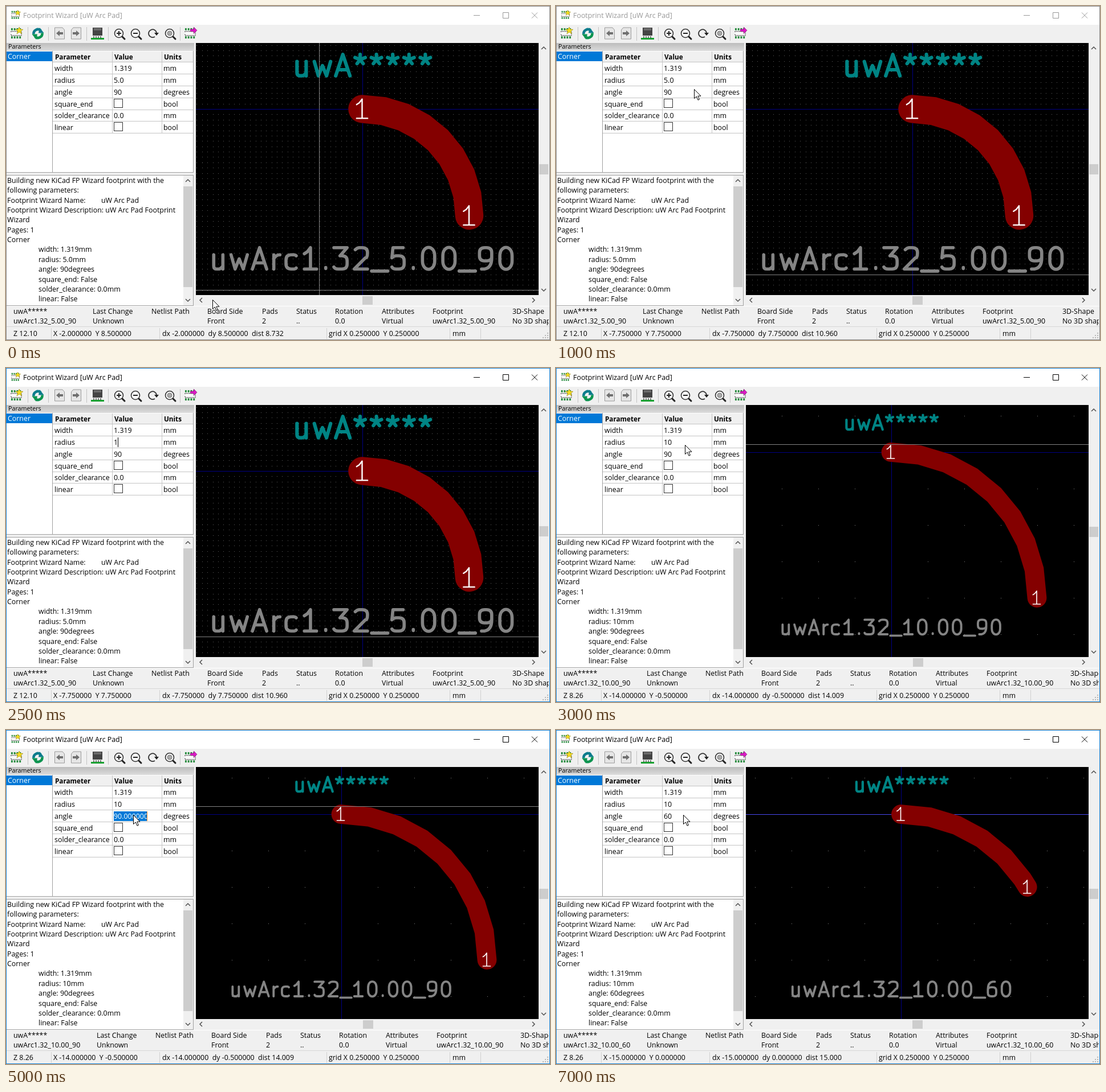
Recreate the animation shown at these times as an HTML page. Size 954x587 px, loop 8 s.

```html
<!DOCTYPE html>
<html lang="en">
<head>
<meta charset="utf-8">
<title>Footprint Wizard</title>
<style>
  html, body { margin: 0; width: 100%; height: 100%; overflow: hidden; background: #f0f0f0; }
  svg { display: block; }
  text { font: 12.4px "Open Sans", "Noto Sans", sans-serif; white-space: pre; }
  .bold { font-weight: 700; font-size: 11.7px; }
  .small { font-size: 10.7px; }
  .timed { visibility: hidden; animation: 8s step-end infinite; }
</style>
</head>
<body>
<svg id="stage" width="954" height="587" viewBox="0 0 954 587"></svg>
<script>
const LOOP = 8000;
const rules = [];

const during = (from, to, content) => {
  const name = `show${rules.length}`;
  const at = ms => ms / LOOP * 100 + '%';
  rules.push(`@keyframes ${name} { 0% { visibility: hidden } ${at(from)} { visibility: visible } ` +
    `${at(to)} { visibility: ${to === LOOP ? 'visible' : 'hidden'} } }`);
  return `<g class="timed" style="animation-name:${name}">${content}</g>`;
};
const box = (x, y, w, h, fill) => `<rect x="${x}" y="${y}" width="${w}" height="${h}" fill="${fill}"/>`;
const text = (x, y, s, fill = '#000', cls = '') => `<text x="${x}" y="${y}" fill="${fill}" class="${cls}">${s}</text>`;
const line = (d, stroke, width = 1, extra = '') =>
  `<path d="${d}" fill="none" stroke="${stroke}" stroke-width="${width}" ${extra}/>`;
const shape = (d, fill, extra = '') => `<path d="${d}" fill="${fill}" ${extra}/>`;
const place = (x, y, content, more = '') => `<g transform="translate(${x} ${y}) ${more}">${content}</g>`;

// Single-stroke lettering: advance and path, cap height 21, baseline 0.
const GLYPHS = {
  u: [19, 'M14-14V0M5-14V-3Q5 0 8 0H10Q12 0 14-3'],
  w: [22, 'M3-14L7 0 11-10 15 0 19-14'],
  A: [18, 'M2 0L9-21 16 0M4-6H14'],
  r: [13, 'M5 0V-14M5-10Q7-14 11-14'],
  c: [18, 'M14-1Q13 0 12 0H9Q4 0 4-5V-9Q4-14 9-14H12Q13-14 14-13'],
  '*': [16, 'M8-21V-16M3-18L8-16 13-18M5-12L8-16 11-12'],
  '.': [10, 'M5-1.5v1'],
  _: [16, 'M0 2H16'],
  0: [20, 'M4-13C4-24 16-24 16-13V-8C16 3 4 3 4-8Z'],
  1: [20, 'M4-15L7-17 10-21V0M4 0H16'],
  2: [20, 'M4-19Q6-21 8-21H11Q16-21 16-16T14-11L3 0H16'],
  3: [20, 'M3-21H16L9-13H11Q16-13 16-8V-5Q16 0 11 0H7Q4 0 3-2'],
  5: [20, 'M15-21H5L4-11Q6-13 8-13H11Q16-13 16-8V-5Q16 0 11 0H8Q5 0 4-2'],
  6: [20, 'M14-21H11Q4-20 4-10V-5Q4 0 9 0H11Q16 0 16-5V-8Q16-13 11-13H9Q4-13 4-9'],
  9: [20, 'M6 0H9Q16-1 16-11V-16Q16-21 11-21H9Q4-21 4-16V-13Q4-8 9-8H11Q16-8 16-12']
};

const lettering = (label, cx, cy, size, weight, color) => {
  let x = 0, body = '';
  for (const ch of label) {
    const [advance, d] = GLYPHS[ch];
    body += `<path d="${d}" transform="translate(${x} 0)"/>`;
    x += advance;
  }
  const k = size / 21;
  return `<g aria-label="${label}" transform="translate(${cx - x * k / 2} ${cy + size / 2}) scale(${k})" fill="none" ` +
    `stroke="${color}" stroke-width="${weight / k}" stroke-linecap="round" stroke-linejoin="round">${body}</g>`;
};

// ---- drawing area ----
const VIEW = { left: 333, top: 65, right: 934, bottom: 508 };
const AXIS = '#000084', CROSS = '#848484';
const hline = (y, color) => box(VIEW.left, y, VIEW.right - VIEW.left, 1, color);
const vline = (x, color) => box(x, VIEW.top, 1, VIEW.bottom - VIEW.top, color);

const dots = (ox, oy, step, color) => {
  let d = '';
  for (let x = ox - Math.floor((ox - VIEW.left) / step) * step; x < VIEW.right - 1; x += step)
    for (let y = oy - Math.floor((oy - VIEW.top) / step) * step; y < VIEW.bottom - 1; y += step)
      d += `M${Math.round(x)} ${Math.round(y)}h1v1h-1z`;
  return shape(d, color);
};

const footprint = ({ ox, oy, mm, radius, angle, name, fine, axisY = AXIS }) => {
  const arcPoint = deg => {
    const a = deg * Math.PI / 180, r = radius * mm;
    return [ox + r * Math.sin(a), oy + r * (1 - Math.cos(a))];
  };
  const points = [];
  for (let deg = 0; deg < angle; deg += 11.25) points.push(arcPoint(deg));
  const end = arcPoint(angle);
  points.push(end);
  const padNumber = (x, y) => lettering('1', x - .5, y - .5, mm * .9, mm * .065, '#fff');
  return (fine ? dots(ox, oy, mm / 4, '#606060') : '') + dots(ox, oy, mm * 2.5, '#848484') +
    vline(Math.round(ox), AXIS) + hline(oy, axisY) +
    line('M' + points.map(p => p.map(v => v.toFixed(2))).join('L'), '#840000', 1.319 * mm, 'stroke-linecap="round"') +
    padNumber(ox, oy) + padNumber(...end) +
    lettering('uwA*****', ox + .5, oy - 2.055 * mm, mm, mm * .165, '#008484') +
    lettering(name, ox, oy + (radius + 2) * mm, mm, mm * .15, '#848484');
};

// ---- small interface parts ----
const chevron = (x, y, turn) =>
  place(x, y, line('M-4 2L0-2 4 2', '#505050', 1.5), `rotate(${turn})`);

const chip = (x, y, size, badge) => {
  let pads = '';
  for (let i = 0; i < 4; i++)
    for (const py of [1, 16])
      pads += box(1 + i * 5, py, 3, 4, '#248a3c');
  const body = line('M1 8.5V7H20V14.5H1V12', '#444', 1.3, 'stroke-dasharray="2 1"');
  const mark = badge === 'star'
    ? shape('M16-1l2 4 5 .5-4 3 1.5 5-4.5-3-4.5 3 1.5-5-4-3 5-.5z', '#f4dc20', 'stroke="#8a7a10" stroke-width=".6"')
    : shape('M11 3h6v-4l6 6-6 6V7h-6z', '#e018c8', 'stroke="#601058" stroke-width=".6"');
  return place(x, y, box(0, 5, 21, 11, '#fafafa') + body + pads + mark, `scale(${size / 22})`);
};

const page = (x, flip) => place(x, 48,
  shape('M-8.5-10H5L8.5-6V10H-8.5Z', '#e6e6e6', 'stroke="#999"') +
  shape('M-6 0L0-5V-2H6V2H0V5Z', '#707070'), flip ? 'scale(-1 1)' : '');

const magnifier = (x, inside) => place(x, 48,
  line('M4 5L9 10', '#222', 3, 'stroke-linecap="round"') +
  `<circle cx="-1" r="7.5" fill="#f8f8f8" stroke="#333" stroke-width="1.6"/>` + inside);

const swirl = color => line('M-7.5 1A7.5 7.5 0 0 1 5-5.5', color, 4.5) + shape('M3-10.5L10.5-1H1Z', color);

const toolbar = () => {
  const seps = [38, 74, 141, 179, 305].map(x => box(x, 37, 1, 24, '#c4c4c4')).join('');
  const refresh = place(56, 48.5, swirl('#0c7c8c') + `<g transform="rotate(180)">${swirl('#0c9450')}</g>`);
  let pins = '';
  for (let i = 0; i < 4; i++) pins += box(153 + i * 4, 53, 2, 4, '#777');
  const board = box(152, 38, 17, 14, '#444') + box(154, 39, 13, 4, '#6a6a6a') + pins + box(149, 56, 23, 3, '#18a030');
  const redraw = place(257, 48, line('M4 6A7 7 0 1 1 7-1', '#333', 1.8) + shape('M3-1H11L7 4Z', '#222'));
  const fit = `<circle cx="-1" r="4" fill="#aaa" stroke="#777"/>`;
  return chip(8, 38, 21, 'star') + refresh + page(94) + page(123, true) + board +
    magnifier(199, line('M-5 0H3M-1-4V4', '#222', 2)) + magnifier(228, line('M-5 0H3', '#222', 2)) + redraw +
    magnifier(288, fit) + chip(313, 38, 21, 'arrow') + seps;
};

const titleBar = (ink, border) =>
  text(30, 21, 'Footprint Wizard [uW Arc Pad]', ink) +
  line('M820 16.5H831M871.5 11.5H881.5V21.5H871.5ZM922 11.5L932 21.5M932 11.5L922 21.5', ink) +
  `<rect x=".5" y=".5" width="953" height="586" fill="none" stroke="${border}"/>`;

const ROWS = [['width', 'mm'], ['radius', 'mm'], ['angle', 'degrees'],
  ['square_end', 'bool'], ['solder_clearance', 'mm'], ['linear', 'bool']];
const rowY = i => Math.round(114.3 + i * 20.75);
const value = (row, s) => text(189, rowY(row), s);

const parameters = () => {
  let out = box(1, 65, 329, 14, 'url(#caption)') + text(4, 75, 'Parameters', '#000', 'small') +
    box(1, 79, 328, 214, '#fff') + box(1, 80, 80, 17, '#0078d7') + text(3, 93, 'Corner', '#fff') +
    box(82, 80, 246, 18, '#f0f0f0') + box(81, 79, 1, 214, '#a0a0a0');
  [[86, 'Parameter'], [190, 'Value'], [277, 'Units']].forEach(([x, s]) => out += text(x, 94, s, '#000', 'bold'));
  ROWS.forEach(([name, unit], i) => {
    const y = rowY(i);
    out += text(85, y, name) + text(276, y, unit) + box(82, y + 5, 246, 1, '#c4c4c4');
    if (unit === 'bool') out += `<rect x="189.5" y="${y - 13.5}" width="15" height="15" fill="#fff" stroke="#333"/>`;
  });
  out += box(82, 98, 246, 1, '#c4c4c4');
  for (const x of [186, 273, 328]) out += box(x, 80, 1, 143, '#c4c4c4');
  return out + box(1, 292, 328, 1, '#a0a0a0') + box(328, 79, 1, 214, '#a0a0a0') +
    value(0, '1.319') + value(4, '0.0');
};

const logY = i => 311 + i * 17.35;
const logPane = () => {
  const lines = ['Building new KiCad FP Wizard footprint with the', 'following parameters:', 'Footprint Wizard Name:',
    'Footprint Wizard Description: uW Arc Pad Footprint', 'Wizard', 'Pages: 1', 'Corner'];
  const fields = { 7: 'width: 1.319mm', 10: 'square_end: False', 11: 'solder_clearance: 0.0mm', 12: 'linear: False' };
  return box(1, 297, 328, 230, '#a0a0a0') + box(1, 298, 327, 228, '#fff') +
    lines.map((s, i) => text(2, logY(i), s)).join('') + text(167, logY(2), 'uW Arc Pad') +
    Object.entries(fields).map(([i, s]) => text(57, logY(+i), s)).join('') +
    box(311, 298, 17, 228, '#f0f0f0') + box(311, 317, 16, 177, '#cdcdcd') +
    chevron(319, 307, 0) + chevron(319, 517, 180);
};
const logValues = (radius, angle) =>
  text(57, logY(8), `radius: ${radius}mm`) + text(57, logY(9), `angle: ${angle}degrees`);

const info = (name, shift) => {
  const cols = [[152, 'Last Change', 'Unknown'], [255, 'Netlist Path', ''], [353, 'Board Side', 'Front'],
    [449, 'Pads', '2'], [509, 'Status', '..'], [577, 'Rotation', '0.0'], [659, 'Attributes', 'Virtual'],
    [748, 'Footprint', name], [888 + shift, '3D-Shape', 'No 3D shape']];
  return text(13, 541, 'uwA*****') + text(13, 558, name) +
    `<g clip-path="url(#window)">` +
    cols.map(([x, a, b]) => text(x + shift, 541, a) + text(x + shift, 558, b)).join('') + '</g>';
};

const GAP = '&#160;&#160;';
const coords = (x, y, dist) =>
  text(83, 580, `X ${x}${GAP}Y ${y}`) + text(274, 580, `dx ${x}${GAP}dy ${y}${GAP}dist ${dist}`);
const zoom = z => text(13, 580, 'Z ' + z);
const thumbs = (x, y) => box(x, 510, 18, 15, '#cdcdcd') + box(935, y, 16, 18, '#cdcdcd');

const caret = (x, row, color = '#000') => box(x, rowY(row) - 13, 1, 17, color);
const selected = (row, s, width) => box(189, rowY(row) - 13, width, 17, '#0078d7') + text(189, rowY(row), s, '#fff');

const pointer = (x, y) => place(x, y,
  shape('M.5 .5V16.5L4.3 13 7 19.3 9.4 18.2 6.8 12.2H12Z', '#fff', 'stroke="#000"'));
const POINTER_STOPS = [[0, 500, 362, 516], [500, 1000, 338, 468], [1000, 1500, 242, 146], [1500, 2500, 226, 135],
  [3000, 4000, 226, 135], [4000, 4500, 232, 132], [4500, 5000, 207, 160], [5000, 6500, 223, 149], [7000, 8000, 223, 149]];

const grip = () => {
  let out = '';
  for (let i = 0; i < 3; i++)
    for (let j = 0; j <= i; j++) out += box(949 - j * 4, 574 + i * 4, 2, 2, '#b8b8b8');
  return out;
};

const SMALL = 'uwArc1.32_5.00_90', LARGE = 'uwArc1.32_10.00_90', SHORT = 'uwArc1.32_10.00_60';

const chrome = box(0, 0, 954, 587, '#f0f0f0') + box(0, 0, 954, 33, '#fff') + chip(9, 8, 16, 'star') + toolbar() +
  parameters() + logPane() + box(333, 65, 601, 443, '#000') +
  chevron(943, 74, 0) + chevron(943, 499, 180) + chevron(342, 517, -90) + chevron(925, 517, 90) +
  box(1, 527, 952, 1, '#fff') + box(1, 563, 952, 1, '#d7d7d7') +
  [79, 269, 562, 778, 832].map(x => box(x, 566, 1, 19, '#d0d0d0')).join('') +
  text(566, 580, `grid X 0.250000${GAP}Y 0.250000`) + text(783, 580, 'mm') + grip();

const scenes =
  during(0, 3000, footprint({ ox: 625, oy: 181, mm: 37.5, radius: 5, angle: 90, name: SMALL, fine: true }) +
    logValues('5.0', 90) + info(SMALL, 0) + zoom('12.10') + thumbs(625, 278)) +
  during(3000, 7000, footprint({ ox: 587.5, oy: 148, mm: 25.6, radius: 10, angle: 90, name: LARGE }) +
    hline(134, CROSS) + logValues(10, 90) + info(LARGE, 7) +
    coords('-14.000000', '-0.500000', '14.009') + thumbs(626, 279)) +
  during(7000, 8000, footprint({ ox: 605, oy: 148, mm: 25.6, radius: 10, angle: 60, name: SHORT, axisY: '#4848f0' }) +
    logValues(10, 60) + info(SHORT, 7) + coords('-15.000000', '0.000000', '15.000') + thumbs(625, 279)) +
  during(3000, 8000, zoom('8.26')) +
  during(0, 500, vline(549, CROSS) + hline(499, CROSS) + coords('-2.000000', '8.500000', '8.732')) +
  during(500, 3000, coords('-7.750000', '7.750000', '10.960')) +
  during(1000, 3000, hline(472, CROSS));

const edits =
  during(0, 1500, value(1, '5.0')) +
  during(1500, 2500, selected(1, '5.000000', 52) + caret(240, 1, '#ff8728')) +
  during(2500, 3000, value(1, '1') + caret(196, 1)) +
  during(3000, 8000, value(1, '10')) +
  during(0, 5000, value(2, '90')) +
  during(5000, 6500, selected(2, '90.000000', 59)) +
  during(5000, 5500, caret(247, 2, '#ff8728')) +
  during(6000, 6500, caret(247, 2, '#ff8728')) +
  during(6500, 8000, value(2, '60')) +
  during(6500, 7000, caret(203, 2));

const titles = during(0, 1500, titleBar('#999', '#8a8a8a')) + during(1500, 8000, titleBar('#000', '#1883d7'));
const pointers = POINTER_STOPS.map(([from, to, x, y]) => during(from, to, pointer(x, y))).join('');

const defs = `<defs><linearGradient id="caption" x2="0" y2="1"><stop stop-color="#bcbcbc"/>` +
  `<stop offset="1" stop-color="#dcdcdc"/></linearGradient>` +
  `<clipPath id="window">${box(1, 527, 951, 36, '#000')}</clipPath></defs>`;

const sheet = document.createElement('style');
sheet.textContent = rules.join('\n');
document.head.append(sheet);
document.getElementById('stage').innerHTML = defs + chrome + scenes + edits + titles + pointers;
</script>
</body>
</html>
```
